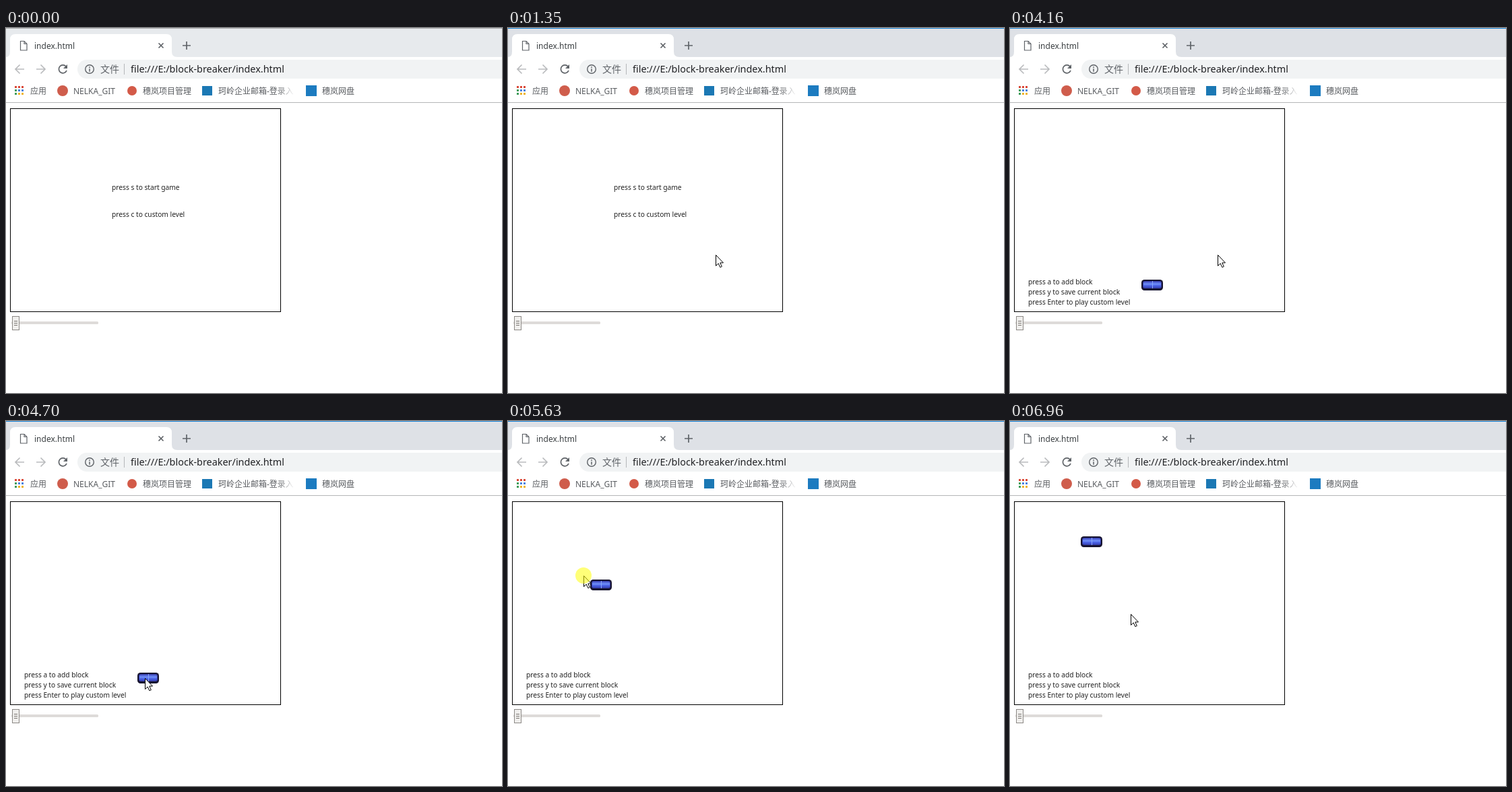
Write an HTML page that moves like this. It is 736 by 541 pixels and loops after 8 s.

```html
<!DOCTYPE html>
<html lang="zh">
<head>
<meta charset="utf-8">
<title>Block breaker level editor</title>
<style>
  html, body { margin: 0; width: 100%; height: 100%; overflow: hidden; background: #fff; }
  svg { display: block; }
  text { font: 12px "Noto Sans", "Noto Sans CJK SC", "Noto Sans CJK", sans-serif; fill: #5a5d61; white-space: pre; }
  .address text { font-size: 14px; fill: #5f6368; }
  .address .url { font-size: 14.4px; fill: #202124; }
  .game text { font-size: 10.2px; fill: #222; }
  .icon { fill: none; stroke: #5f6368; stroke-width: 1.7; }
  .off { stroke: #babcbe; }
</style>
</head>
<body>
<svg width="736" height="541" viewBox="0 0 736 541">
  <defs>
    <linearGradient id="fade" gradientUnits="userSpaceOnUse" x1="402" x2="428">
      <stop stop-color="#5a5d61"/><stop offset="1" stop-color="#fff"/>
    </linearGradient>
    <linearGradient id="shine" x2="0" y2="1">
      <stop stop-color="#4450c8"/><stop offset=".4" stop-color="#7090f8"/>
      <stop offset=".65" stop-color="#4a62e6"/><stop offset="1" stop-color="#3a46bc"/>
    </linearGradient>
  </defs>

  <!-- Tab strip -->
  <rect id="strip" width="736" height="43"/>
  <rect id="topLine" width="736" height="1"/>
  <path fill="#fff" d="M0 43q6 0 6-8V17q0-8 8-8H238q8 0 8 8V35q0 8 8 8z"/>
  <path class="icon" style="stroke-width:1.2" d="M21.5 19.5h5.5l4 4v9.5h-9.5zM27 19.5v4h4"/>
  <text x="42" y="31" style="fill:#3c4043">index.html</text>
  <path class="icon" d="M226.500 22.500l7 7m0-7l-7 7"/>
  <path class="icon" d="M262 26h12m-6-6v12"/>

  <!-- Toolbar -->
  <path class="icon off" d="M27 61H14m6.5-6.5L14 61l6.5 6.5"/>
  <path class="icon off" d="M45 61h13m-6.500-6.500L58 61l-6.500 6.500"/>
  <path class="icon" d="M89 57a6 6 0 1 0 1 6"/>
  <path fill="#5f6368" d="M91 54v6h-6z"/>
  <g class="address">
    <rect x="106" y="47" width="660" height="28" rx="14" fill="#f1f3f4"/>
    <circle class="icon" style="stroke-width:1.4" cx="124" cy="61" r="6.3"/>
    <path class="icon" style="stroke-width:1.5" d="M124 57.300v1.600m0 1.300v4.600"/>
    <text x="140" y="66">文件</text>
    <path stroke="#b4b7ba" d="M175.5 53v16"/>
    <text class="url" x="185" y="66">file:///E:/block-breaker/index.html</text>
  </g>

  <!-- Bookmarks -->
  <g stroke-width="3" stroke-dasharray="3 2">
    <path stroke="#db4a3a" d="M13 87.500h13"/>
    <path stroke="#4a82e0" d="M13 92.500h13"/>
    <path stroke="#f0b429" d="M13 97.500h13"/>
    <path stroke="#3f9d5a" d="M14.500 91v8"/>
  </g>
  <text x="36" y="98">应用</text>
  <circle cx="84" cy="93" r="8" fill="#cf5d4c"/>
  <text x="100" y="98">NELKA_GIT</text>
  <circle cx="187" cy="93" r="7" fill="#d35a48"/>
  <text x="203" y="98">穗岚项目管理</text>
  <rect x="291" y="86" width="15" height="14" fill="#1b78b4"/>
  <text x="315" y="98" style="fill:url(#fade)">珂岭企业邮箱-登录入</text>
  <rect x="445" y="85" width="16" height="16" fill="#1c7bc0"/>
  <text x="469" y="98">穗岚网盘</text>
  <rect y="110" width="736" height="1" fill="#b5b6b8"/>

  <!-- Game -->
  <g class="game">
    <rect x="6.5" y="119.5" width="401" height="301" fill="#fff" stroke="#000"/>
    <g id="menu">
      <text x="157" y="240">press s to start game</text>
      <text x="157" y="280">press c to custom level</text>
    </g>
    <g id="editor">
      <text x="27" y="380">press a to add block</text>
      <text x="27" y="395">press y to save current block</text>
      <text x="27" y="410">press Enter to play custom level</text>
    </g>
    <g id="block">
      <rect width="32" height="16" rx="4.5" fill="#17142f"/>
      <rect x="2" y="2" width="28" height="11" rx="3" fill="#343aa0"/>
      <rect x="3" y="3" width="26" height="9" rx="2" fill="url(#shine)"/>
      <path stroke="#8aa6f8" d="M16.5 2v11"/>
    </g>
  </g>

  <!-- Slider -->
  <rect x="8" y="435" width="129" height="4" rx="1.5" fill="#dedbd9"/>
  <rect x="9.5" y="427.5" width="10" height="20" fill="#f0efed" stroke="#8c8986"/>
  <path stroke="#77736f" d="M12 434.500h5m-5 3h5m-5 3h5"/>

  <path id="cursor" fill="#fff" stroke="#000" d="M.5.5V16.5L4.200 13l2.600 5.700 2.500-1.100L6.800 12H11.500z"/>
  <circle id="press" r="12" fill="#ff0" fill-opacity=".53"/>
</svg>
<script>
const el = id => document.getElementById(id);
const LOOP = 8000;
const STEP = 78; // the screen refreshes moving things about this often

const linear = p => p;
const easeOut = p => p * (2 - p);
const easeInOut = p => p * p * (3 - 2 * p);

// Stops along each path; the easing belongs to the way towards that stop
const cursorPath = [
  { t: 90, at: [568, 461] },
  { t: 740, at: [308, 336], ease: easeOut },
  { t: 4160, at: [308, 336] },
  { t: 4700, at: [206, 381], ease: easeInOut },
  { t: 5080, at: [206, 381] },
  { t: 5250, at: [193, 346] },
  { t: 5630, at: [112, 229] },
  { t: 5880, at: [97, 168], ease: easeOut },
  { t: 6170, at: [97, 168] },
  { t: 6640, at: [178, 288], ease: easeInOut },
  { t: 6790, at: [178, 288] },
  { t: 6960, at: [179, 286] }
];
const blockPath = [
  { t: 4160, at: [195, 373] },
  { t: 5160, at: [195, 373] },
  { t: 5250, at: [214, 375] },
  { t: 5630, at: [122, 235] },
  { t: 5880, at: [105, 172], ease: easeOut },
  { t: 5940, at: [105, 171] }
];

function position(path, t) {
  const next = path.findIndex(stop => stop.t > t);
  if (next === 0) return null;
  if (next < 0) return path[path.length - 1].at;
  const a = path[next - 1], b = path[next];
  const steps = Math.round((b.t - a.t) / STEP);
  const done = Math.floor((t - a.t) / (b.t - a.t) * steps) / steps;
  const p = (b.ease || linear)(done);
  return a.at.map((v, i) => Math.round(v + (b.at[i] - v) * p));
}

function show(node, visible) {
  node.style.display = visible ? '' : 'none';
}

function place(node, point) {
  show(node, point);
  if (point) node.setAttribute('transform', `translate(${point})`);
}

function draw(t) {
  const focused = t >= 1200;
  const pressed = (t >= 1200 && t < 1350) || (t >= 5080 && t < 6170);
  const pointer = position(cursorPath, t);
  el('strip').setAttribute('fill', focused ? '#dee1e6' : '#e7eaed');
  el('topLine').setAttribute('fill', focused ? '#1883d7' : '#aaabad');
  show(el('menu'), t < 2760);
  show(el('editor'), t >= 2760);
  place(el('block'), position(blockPath, t));
  place(el('cursor'), pointer);
  place(el('press'), pressed && pointer);
}

function tick() {
  draw(performance.now() % LOOP);
  requestAnimationFrame(tick);
}
tick();
</script>
</body>
</html>
```
